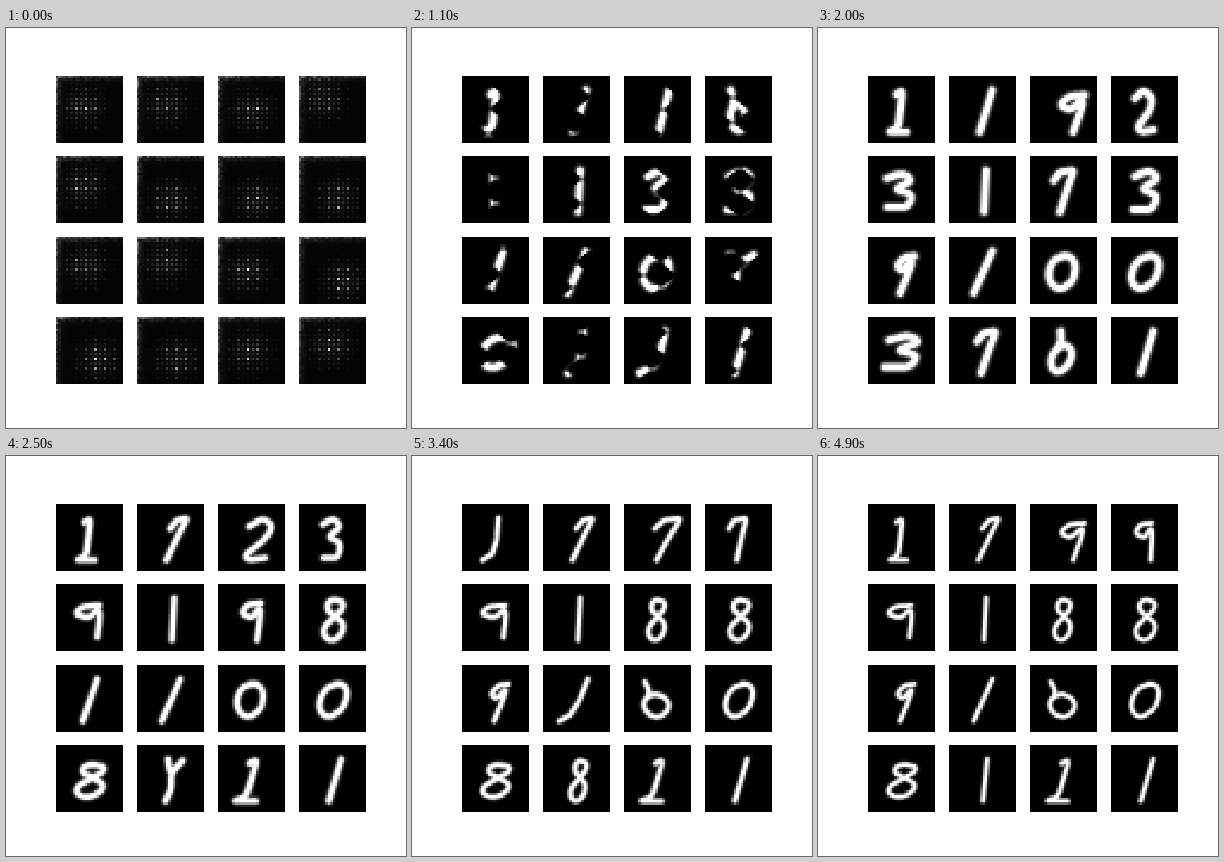
An HTML page with a canvas that plays this animation: 400 px wide and 400 px high, repeating every 5 s.

```html
<!DOCTYPE html>
<html>
<head>
<meta charset="utf-8">
<style>
html, body { margin: 0; height: 100%; overflow: hidden; background: #fefefe; }
canvas { display: block; width: 400px; height: 400px; }
</style>
</head>
<body>
<canvas id="stage" width="400" height="400"></canvas>
<script>
const N = 28, SIZE = 67, STEP = 100, LOOP = 5000, POINTS = 48;
const times = [1100, 2000, 2500, 3400, 4300, 4900];
const view = document.getElementById('stage').getContext('2d');
view.imageSmoothingEnabled = false;

const small = document.createElement('canvas');
small.width = small.height = N;
const pen = small.getContext('2d', { willReadFrequently: true });

// Each glyph is one stroke through a few points of a unit box
const glyphs = {
  0: '.6,.05 .2,.15 0,.5 .1,.85 .45,1 .9,.75 1,.3 .8,.05 .5,.05',
  1: '.5,0 .5,1',
  2: '0,.2 .5,0 1,.2 .8,.5 .1,.9 .3,1 1,.95',
  3: '0,.15 .6,0 1,.2 .3,.45 1,.6 .8,.95 0,.95',
  5: '1,0 .2,.1 .2,.4 .9,.5 .8,.9 0,1',
  6: '.1,0 .3,.3 0,.6 .2,.9 .6,1 1,.75 .9,.45 .4,.3 .1,.5',
  7: '0,.25 .3,.05 1,0 .7,.45 .4,1',
  8: '.8,.1 .3,0 .1,.25 .5,.42 1,.65 .7,1 .2,1 0,.75 .5,.45 .95,.2 .8,.1',
  9: '.95,.12 .3,.15 0,.35 .5,.48 .95,.2 .95,.5 .85,1',
  i: '.2,.1 .5,0 .5,.4 .5,.9 0,1 1,1',
  j: '.6,0 .65,.5 .5,.85 0,1',
  y: '.1,0 .3,.35 1,0 .35,.35 .45,.7 .2,1'
};

const clamp = v => Math.max(0, Math.min(1, v));
const mix = (a, b, k) => a + (b - a) * k;

// Repeatable noise in 0..1
function noise(a, b) {
  const s = Math.sin(a * 12.9898 + b * 78.233) * 43758.5453;
  return s - Math.floor(s);
}

// Evenly spaced points along a glyph, so that any two can be blended
function trace(name) {
  const p = glyphs[name].split(' ').map(s => s.split(',').map(Number));
  const at = [0];
  for (let i = 1; i < p.length; i++)
    at.push(at[i - 1] + Math.hypot(p[i][0] - p[i - 1][0], p[i][1] - p[i - 1][1]));
  const line = Array.from({ length: POINTS }, (_, n) => {
    const d = at[at.length - 1] * n / (POINTS - 1);
    let i = 1;
    while (i < p.length - 1 && at[i] < d) i++;
    const k = (d - at[i - 1]) / (at[i] - at[i - 1]);
    return [mix(p[i - 1][0], p[i][0], k), mix(p[i - 1][1], p[i][1], k)];
  });
  return line.map((q, n) => {
    const a = line[Math.max(0, n - 2)], b = line[Math.min(POINTS - 1, n + 2)];
    return n && n < POINTS - 1 ? q.map((v, c) => (a[c] + v + b[c]) / 3) : q;
  });
}

// Glyph sequence, centre, width, slant, glow of the first output, height
const cells = [];
function cell(names, x, width, slant, glowX, glowY, height = 42) {
  const poses = [...names].map(name => trace(name).map(([u, v]) =>
    [x + (u - .5) * width + slant * (.5 - v) * height, 35 + (v - .5) * height]));
  cells.push({ poses, glowX, glowY });
}
cell('iiijyi', 32, 18, .12, 11, 12);
cell('117777', 37, 14, .3, 12, 11);
cell('192799', 40, 24, .25, 14, 14);
cell('623799', 33, 18, -.02, 10, 9);
cell('139999', 32, 26, -.02, 11, 12, 36);
cell('111151', 36, 14, .05, 14, 18);
cell('379838', 33, 20, .05, 15, 18);
cell('338888', 35, 24, .05, 16, 17);
cell('191999', 34, 15, .35, 12, 11);
cell('111j11', 34, 16, .45, 12, 10);
cell('000666', 32, 28, 0, 12, 14, 36);
cell('y00000', 34, 28, .15, 18, 18, 36);
cell('038858', 35, 32, .15, 17, 17, 34);
cell('j7y8y1', 36, 18, .1, 16, 17);
cell('j6iiii', 33, 22, .3, 13, 14);
cell('111111', 36, 4, .3, 13, 11);

// Untrained output: a dot lattice around a glow, with grey edges
function lattice(x, y, { glowX, glowY }, c) {
  const r = noise(y * N + x, c + 1);
  const dot = x % 4 == 0 && y % 4 == 1 ? 1 : x % 2 == 0 && y % 2 == 1 ? .3 : .06;
  const glow = Math.exp(-((x - glowX) ** 2 + (y - glowY) ** 2) / 45);
  const edge = Math.exp(-Math.min(x, y)) * (.12 + .3 * Math.exp(-(x + y) / 9));
  return .015 + dot * glow * (.4 + .6 * r) + edge * (.3 + r);
}

function drawStroke(line, width) {
  pen.setTransform(N / SIZE, 0, 0, N / SIZE, 0, 0);
  pen.clearRect(0, 0, SIZE, SIZE);
  pen.lineCap = pen.lineJoin = 'round';
  pen.beginPath();
  line.forEach(p => pen.lineTo(...p));
  for (const [scale, alpha] of [[1.6, .25], [.95, 1]]) {
    pen.globalAlpha = alpha;
    pen.lineWidth = width * scale;
    pen.stroke();
  }
}

function draw(time) {
  let a = 0;
  while (a < times.length - 2 && times[a + 1] <= time) a++;
  const k = clamp((time - times[a]) / (times[a + 1] - times[a]));
  const sway = 6 * k * (1 - k);
  const width = 4.4 + 3 * Math.exp(-Math.max(0, time - 2000) / 900);
  const broken = clamp((2000 - time) / 900);
  const raw = clamp(1 - time / 1100) ** 2;
  const grown = clamp((time - 100) / 700);

  cells.forEach((item, c) => {
    const { poses } = item, phase = 6.3 * noise(c + 1, time / STEP);
    const line = poses[a].map(([x, y], n) => {
      const [bx, by] = poses[a + 1][n];
      return [mix(x, bx, k) + sway * Math.sin(y / 9 + phase),
        mix(y, by, k) + sway * Math.cos(x / 9 + phase) / 2];
    });
    drawStroke(line, width);
    const image = pen.getImageData(0, 0, N, N), data = image.data;
    for (let i = 0; i < N * N; i++) {
      const x = i % N, y = Math.floor(i / N);
      const patch = Math.sin(x * .45 + c * 2) + Math.sin(y * .6 + c * 3);
      const keep = clamp(1 - broken * (.5 + 2 * patch));
      const v = data[i * 4 + 3] / 255 * keep * grown
        + (raw && lattice(x, y, item, c) * raw);
      data.fill(255 * clamp(v), i * 4, i * 4 + 3);
      data[i * 4 + 3] = 255;
    }
    pen.putImageData(image, 0, 0);
    view.drawImage(small, 50 + 81 * (c % 4),
      Math.round(48 + 80.4 * Math.floor(c / 4)), SIZE, SIZE);
  });
}

let shown = -1;
const began = performance.now();
function tick() {
  const time = Math.floor((performance.now() - began) % LOOP / STEP) * STEP;
  if (time != shown) draw(shown = time);
  requestAnimationFrame(tick);
}
tick();
</script>
</body>
</html>
```
